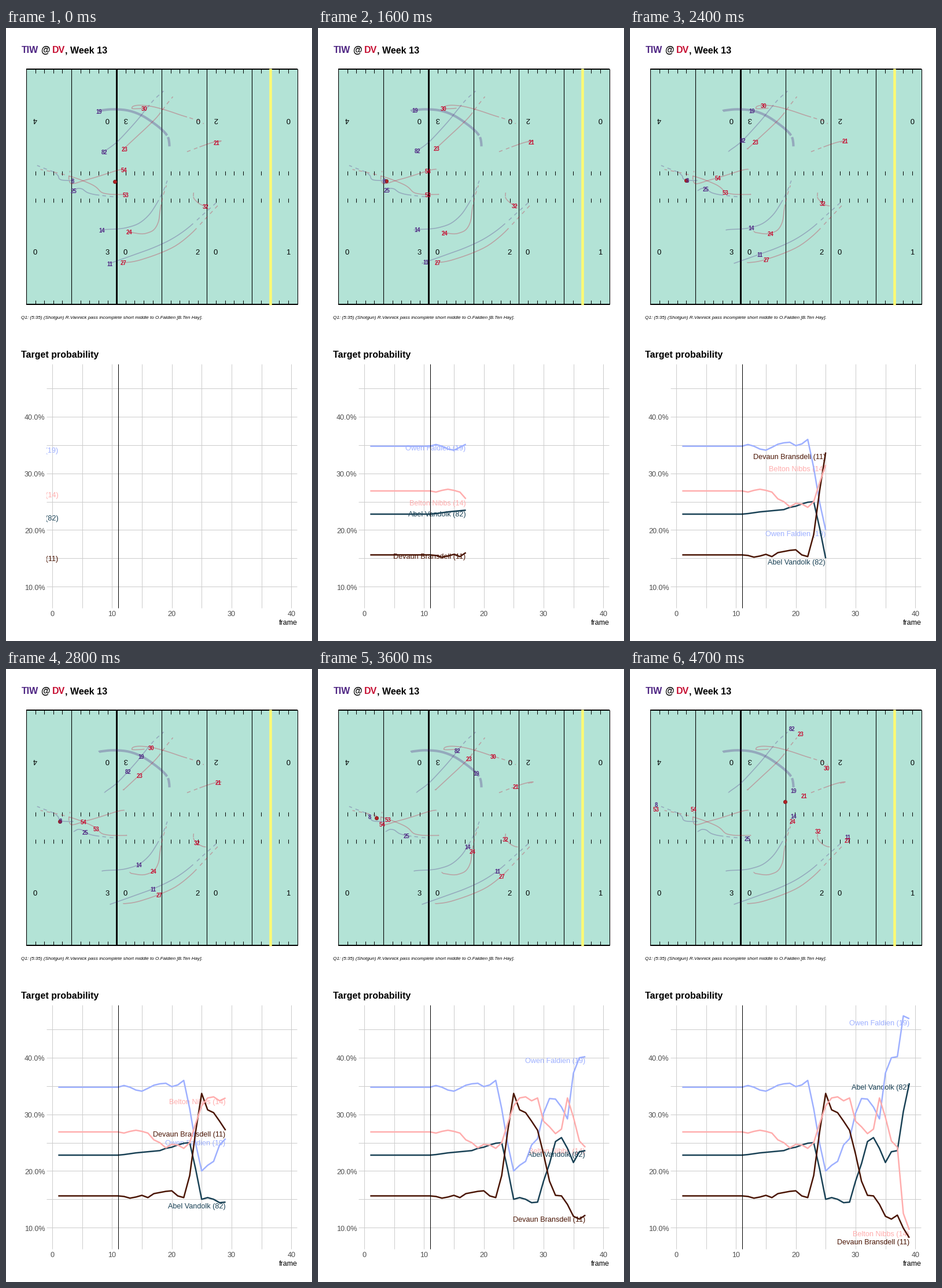
Write a matplotlib script that moves like this. It is 529 by 1058 pixels and loops after 5.8 s.

```python
import numpy as np
import matplotlib.pyplot as plt
from matplotlib.animation import FuncAnimation
from matplotlib.patches import Rectangle

W, H, DPI = 529, 1058, 64
PT = 72 / DPI
LAST, RELEASE, ARRIVAL = 47, 38, 45
OFF, DEF = "#4F2683", "#C60C30"
BLUE, TEAL, BROWN, PINK = "#9EB0FF", "#194155", "#4A1504", "#FFADAD"

plt.rcParams["font.family"] = "Liberation Sans"
fig = plt.figure(figsize=(W / DPI, H / DPI), dpi=DPI, facecolor="white")
ax = fig.add_axes([0, 0, 1, 1])
ax.set_xlim(-0.5, W - 0.5)
ax.set_ylim(H - 0.5, -0.5)
ax.axis("off")


def put(x, y, s, px, color="black", ha="left", flip=False, **kw):
    """Write s with the middle of its capitals at height y."""
    dy = -0.36 * px if flip else 0.36 * px
    return ax.text(x, y + dy, s, fontsize=px * PT, color=color, ha=ha, va="baseline",
                   rotation=180 if flip else 0, rotation_mode="anchor", **kw)


def vline(x, y0, y1, color="black", px=1.0, z=2):
    ax.vlines(x, y0, y1, colors=color, linewidths=px * PT, zorder=z)


def hline(y, x0, x1, color="black", px=1.0, z=2):
    ax.hlines(y, x0, x1, colors=color, linewidths=px * PT, zorder=z)


# ---- field ----
L, R, TOP, BOT = 34.5, 503, 70.5, 476
YARD = (R - L) / 30

put(26, 37, "TIW", 16, OFF, weight="bold")
put(59.8, 37, "@", 16, weight="bold")
put(79.8, 37, "DV", 16, DEF, weight="bold")
put(102, 37, ", Week 13", 16, weight="bold")
put(26, 499, "Q1: (5:35) (Shotgun) R.Vannick pass incomplete short middle "
    "to O.Faldien [B.Ten Hay].", 8.15, style="italic")

ax.add_patch(Rectangle((L, TOP), R - L, BOT - TOP, fc="#B3E3D6", ec="none", zorder=1))
yards = L + YARD * np.arange(31)
for y0, y1 in ((TOP, 77), (246, 253), (293, 300), (469, BOT)):
    vline(yards, y0, y1)
vline(yards[::5], TOP, BOT, px=1.1)
hline([TOP, BOT], L, R, px=2)
vline(yards[10], TOP, BOT, px=3)
vline(456, TOP - 1, BOT + 1, "#FFFA73", 4.6)

for x, up, down in ((50, "4", "0"), (174.5, "0", "3"), (206, "3", "0"),
                    (331, "0", "2"), (362, "2", "0"), (487, "0", "1")):
    put(x, 159.5, up, 13, ha="center", flip=True, zorder=2)
    put(x, 386, down, 13, ha="center", zorder=2)


# ---- players ----
class Track:
    """Smooth motion through (time, x, y) keys, at rest before the first."""

    def __init__(self, *keys):
        keys = np.array(keys, float)
        self.t, self.p = keys[:, 0], keys[:, 1:]
        self.v = np.gradient(self.p, self.t, axis=0)
        self.v[0] = 0

    def at(self, time):
        time = np.clip(time, self.t[0], self.t[-1])
        i = np.searchsorted(self.t[1:-1], time, side="right")
        h = self.t[i + 1] - self.t[i]
        u = (time - self.t[i]) / h
        a = (1 + 2 * u) * (1 - u) ** 2
        b = u * u * (3 - 2 * u)
        return (a * self.p[i] + b * self.p[i + 1]
                + h * u * (1 - u) ** 2 * self.v[i] - h * u * u * (1 - u) * self.v[i + 1])


players = []


def player(num, color, *keys, px=1.6):
    track = Track(*keys)
    spots = np.array([track.at(t) for t in range(ARRIVAL + 1)]) - (0, 1.2)
    for part, style in ((spots[:RELEASE + 1], "-"), (spots[RELEASE + 1:], (0, (4, 4)))):
        ax.plot(*part.T, color=color, alpha=0.3, lw=px * PT, ls=style,
                solid_capstyle="butt", dash_capstyle="butt", zorder=3)
    label = put(0, 0, num, 9.5, color, ha="center", weight="bold", zorder=6)
    players.append((label, track))


player("19", OFF, (10, 160, 144), (16, 167, 142.5), (20, 185, 141), (24, 210, 143),
       (28, 233, 151), (32, 255, 165), (36, 273, 180), (39, 279.5, 189),
       (42, 281.5, 197.5), (45, 282, 205), (47, 282, 210), px=4.2)
player("82", OFF, (10, 170, 214), (16, 172, 212), (24, 195, 194), (28, 211, 177),
       (32, 227, 159), (36, 241, 141.5), (40, 254, 126), (47, 279.5, 103))
player("14", OFF, (10, 165, 349.5), (16, 171, 348.5), (24, 209, 345), (28, 229, 338),
       (32, 246, 324), (36, 258, 307), (40, 268.5, 288), (47, 282, 254.5))
player("11", OFF, (10, 179, 407), (16, 186, 404.5), (24, 224, 391), (28, 254, 380),
       (32, 284, 366), (36, 310, 349), (41, 342, 321), (47, 376, 290.5))
player("25", OFF, (10, 117, 281.5), (16, 118, 280.5), (20, 124, 277.5), (24, 131, 278.5),
       (28, 136, 282), (32, 141, 285), (36, 152, 288), (41, 176, 291), (47, 202, 293.5))
player("8", OFF, (10, 115, 264), (16, 114, 264), (20, 108, 264), (24, 99, 263.5),
       (28, 94, 262.5), (32, 91, 260), (36, 89, 255), (39, 82, 249.5),
       (43, 62, 241.5), (47, 45, 234.5))
player("30", DEF, (0, 239, 139), (8, 227, 140), (16, 217, 139), (20, 220, 135.5),
       (24, 231, 134), (28, 251, 136), (32, 276, 142.5), (36, 303, 151.5),
       (40, 321, 157), (44, 340, 164), (47, 340, 171))
player("23", DEF, (0, 204, 209), (8, 202, 209), (16, 204, 208), (24, 216, 197),
       (28, 230, 184), (32, 244, 171), (36, 260, 155), (41, 276, 134), (47, 294, 112))
player("21", DEF, (0, 363, 198), (8, 366, 197), (16, 368.5, 197), (24, 371, 195.5),
       (28, 366, 196), (32, 354, 199), (36, 341, 203.5), (47, 300, 219))
player("54", DEF, (0, 204, 245), (8, 202, 244.5), (16, 190, 247), (24, 152, 259),
       (28, 134, 264), (32, 118, 269), (36, 111, 268.5), (40, 108, 260),
       (44, 110, 250), (47, 110, 242))
player("53", DEF, (0, 207, 288), (10, 205, 288), (16, 190, 288), (20, 178, 287.5),
       (24, 165, 284.5), (28, 156, 276), (32, 145, 269.5), (36, 121, 260),
       (39, 101, 254), (47, 45, 242))
player("24", DEF, (0, 213, 352), (8, 214, 352), (16, 219, 354), (24, 242, 355),
       (28, 255, 349), (32, 263, 335), (36, 266, 315), (40, 269.5, 296), (47, 280, 263))
player("32", DEF, (0, 345, 308), (8, 343, 307.5), (16, 340, 307), (24, 333, 303.5),
       (32, 326, 297), (36, 324, 294), (41, 323.5, 289), (47, 324.5, 280))
player("27", DEF, (10, 202, 405), (16, 206, 405.5), (24, 235, 400), (28, 264, 390),
       (32, 292, 377), (36, 317, 358), (41, 346, 328), (47, 375.5, 296.5))

ball_track = Track((10, 187, 264), (12, 172, 264), (15, 124, 263), (16, 117, 263),
                   (20, 106, 263), (24, 96, 262.5), (28, 92.5, 262), (32, 91, 260),
                   (34, 94, 258), (36, 100, 256), (38, 104, 251), (45, 279, 207),
                   (47, 267, 228))
ball, = ax.plot([], [], "o", ms=6.2 * PT, mfc="#B22222", mec="#7A1A24",
                mew=0.8 * PT, zorder=5)

# ---- chart ----
CL, CR, CT, CB = 69.5, 502.5, 579, 1000
GRID, GREY = "#CCCCCC", "#4D4D4D"


def px_x(f):
    return 79.5 + 10.33 * np.asarray(f)


def px_y(p):
    return 670.5 - 9.77 * (np.asarray(p) - 40)


put(26, 562.5, "Target probability", 16, weight="bold")
vline(px_x(range(0, 41, 5)), CT, CB, GRID)
hline(px_y(range(10, 46, 5)), CL, CR, GRID)
vline(px_x(11), CT, CB, z=8)
for f in range(0, 41, 10):
    put(px_x(f), 1009.5, str(f), 12.6, GREY, ha="center")
for p in range(10, 41, 10):
    put(67, px_y(p) + 1, f"{p:.1f}%", 12.5, GREY, ha="right")
put(503, 1025.5, "frame", 12.5, ha="right")

panel = Rectangle((CL, CT), CR - CL, CB - CT, transform=ax.transData)
curves = []


def curve(name, color, order, text_order, start, later):
    """Flat at start for frames 1 to 11, then one value per frame."""
    ys = px_y([start] * 11 + later)
    line, = ax.plot([], [], color=color, lw=2.5 * PT, solid_capstyle="butt",
                    zorder=5 + order / 10)
    label = put(0, 0, name, 12.6, color, ha="right", zorder=4 + text_order / 10)
    label.set_clip_on(True)
    label.set_clip_path(panel)
    curves.append((line, label, ys))


curve("Owen Faldien (19)", BLUE, 1, 1, 34.8,
      [35.1, 34.8, 34.3, 34.1, 34.6, 35.15, 35.4, 35.5, 34.9, 35.2, 36.0, 31.0, 24.8, 20.0,
       21.0, 21.7, 24.6, 25.7, 30.2, 32.8, 32.7, 31.3, 29.2, 37.3, 40.0, 40.2, 47.4, 46.9])
curve("Abel Vandolk (82)", TEAL, 2, 3, 22.8,
      [22.9, 23.05, 23.2, 23.3, 23.4, 23.5, 23.6, 24.0, 24.2, 24.6, 24.9, 25.0, 20.3, 15.0,
       15.3, 15.0, 14.4, 14.5, 18.2, 21.3, 25.2, 25.9, 24.0, 21.5, 23.4, 23.6, 30.5, 35.5])
curve("Devaun Bransdell (11)", BROWN, 3, 4, 15.6,
      [15.5, 15.2, 15.4, 15.7, 15.3, 16.0, 16.2, 16.4, 16.5, 15.6, 15.3, 19.2, 27.0, 33.7,
       30.8, 30.3, 28.8, 27.2, 23.0, 18.2, 15.7, 15.6, 14.1, 12.0, 11.5, 12.2, 9.9, 8.2])
curve("Belton Nibbs (14)", PINK, 4, 2, 26.9,
      [26.7, 27.0, 27.2, 27.0, 26.7, 25.5, 25.0, 24.1, 24.7, 24.6, 24.0, 25.0, 28.4, 31.5,
       32.9, 33.1, 32.4, 32.9, 28.8, 27.8, 26.6, 27.4, 32.9, 29.5, 25.3, 24.2, 12.5, 9.6])


def draw(step):
    t = step if step < LAST else LAST
    for label, track in players:
        x, y = track.at(t)
        label.set_position((x, y + 3.4))
    bx, by = ball_track.at(t)
    ball.set_data([bx], [by])

    n = (t if t < RELEASE else RELEASE) + 1
    xs = px_x(np.arange(1, n + 1))
    for line, label, ys in curves:
        line.set_data(xs, ys[:n])
        label.set_position((xs[-1], ys[n - 1] + 11))
    return []


anim = FuncAnimation(fig, draw, frames=58, interval=100, init_func=lambda: draw(0),
                     repeat=True, blit=False)
plt.show()
```
